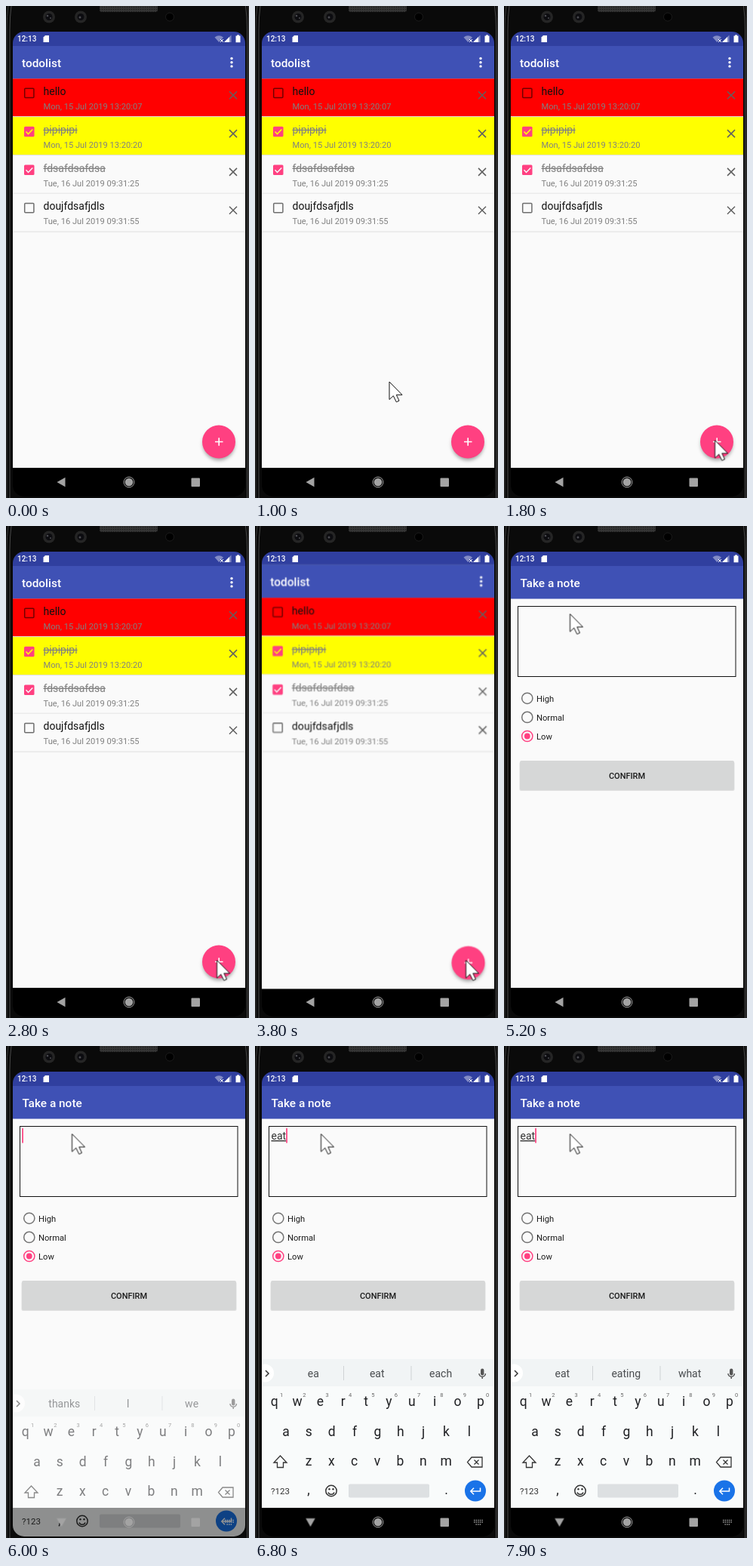
Recreate the animation shown at these times as an HTML page. Size 322x652 px, loop 8000 ms.

```html
<!DOCTYPE html>
<html lang="en">
<head>
<meta charset="utf-8">
<title>todolist</title>
<style>
html, body { margin: 0; width: 100%; height: 100%; overflow: hidden; background: #0a0a0a; }
svg { display: block; font-family: Roboto, sans-serif; }
.medium { font-weight: 500; }
.mid { text-anchor: middle; }
.line { fill: none; stroke-width: 1.5; }

/* Every part holds its pose until the next 100 ms step. */
.anim { animation: 8s step-end -5ms infinite; }
#list { animation-name: list; transform-origin: 163px 331px; }
#note { animation-name: note; transform-origin: 163px 331px; }
#ripple { animation-name: ripple; }
#lift { animation-name: lift; }
#caret { animation-name: caret; }
#typed1 { animation-name: typed1; }
#typed2 { animation-name: typed2; }
#typed3 { animation-name: typed3; }
#words1 { animation-name: words1; }
#words2 { animation-name: words2; }
#words3 { animation-name: words3; }
#keyboard { animation-name: keyboard; }
#back { animation-name: back; transform-origin: 73.5px 631px; }
#switcher { animation-name: switcher; }
#pointer { animation-name: pointer; }

@keyframes list {
  0% { transform: none; opacity: 1; }
  46.25% { transform: scale(1.002); }
  47.5% { transform: scale(1.005); }
  48.75% { transform: scale(1.04); }
  51.25% { transform: scale(1.045); opacity: 1; }
  52.5%, 100% { transform: none; opacity: 0; }
}
@keyframes note {
  0% { transform: scale(.96); opacity: 0; }
  48.75% { transform: scale(.96); opacity: 1; }
  51.25% { transform: scale(.993); }
  52.5%, 100% { transform: none; opacity: 1; }
}
@keyframes ripple {
  0% { opacity: 0; }
  32.5% { opacity: .14; }
  33.75% { opacity: .24; }
  35%, 100% { opacity: 0; }
}
@keyframes lift {
  0% { opacity: 0; }
  32.5% { opacity: 1; }
  35%, 100% { opacity: 0; }
}
@keyframes caret {
  0% { opacity: 1; transform: none; }
  52.5% { opacity: 0; }
  58.75% { opacity: 1; }
  65% { opacity: 0; }
  71.25% { opacity: 1; }
  77.5% { opacity: 0; transform: none; }
  78.75% { opacity: 1; transform: translateX(7.5px); }
  80% { transform: translateX(15px); }
  85% { opacity: 1; transform: translateX(20px); }
  91.25% { opacity: 0; }
  98.75%, 100% { opacity: 1; transform: translateX(20px); }
}
@keyframes typed1 { 0%, 80% { opacity: 0; } 78.75% { opacity: 1; } 100% { opacity: 0; } }
@keyframes typed2 { 0%, 85% { opacity: 0; } 80% { opacity: 1; } 100% { opacity: 0; } }
@keyframes typed3 { 0% { opacity: 0; } 85%, 100% { opacity: 1; } }
@keyframes words1 { 0% { opacity: 1; } 80%, 100% { opacity: 0; } }
@keyframes words2 { 0%, 86.25% { opacity: 0; } 80% { opacity: 1; } 100% { opacity: 0; } }
@keyframes words3 { 0% { opacity: 0; } 86.25%, 100% { opacity: 1; } }
@keyframes keyboard {
  0% { opacity: 0; transform: translateY(46px); }
  71.25% { opacity: .35; transform: translateY(46px); }
  75% { opacity: .57; transform: translateY(40px); }
  77.5% { opacity: .9; transform: translateY(10px); }
  78.75%, 100% { opacity: 1; transform: none; }
}
@keyframes back {
  0% { transform: none; }
  67.5% { transform: rotate(-50deg); }
  68.75%, 100% { transform: rotate(-90deg); }
}
@keyframes switcher { 0% { opacity: 0; } 67.5%, 100% { opacity: 1; } }
@keyframes pointer {
  0% { transform: translate(400px, 64px); }
  5% { transform: translate(309px, 64px); }
  6.25% { transform: translate(226px, 198px); }
  7.5% { transform: translate(167px, 318px); }
  8.75% { transform: translate(141px, 387px); }
  10% { transform: translate(130px, 439px); }
  11.25% { transform: translate(138px, 466px); }
  12.5% { transform: translate(178px, 498px); }
  13.75% { transform: translate(214px, 528px); }
  15% { transform: translate(241px, 550px); }
  16.25% { transform: translate(262px, 566px); }
  17.5% { transform: translate(277px, 576px); }
  18.75% { transform: translate(288px, 580px); }
  20% { transform: translate(286px, 579px); }
  21.25% { transform: translate(282px, 577px); }
  22.5% { transform: translate(279.5px, 575.5px); }
  55% { transform: translate(272px, 542px); }
  56.25% { transform: translate(241px, 442px); }
  57.5% { transform: translate(196px, 322px); }
  58.75% { transform: translate(150px, 222px); }
  60% { transform: translate(115px, 158px); }
  61.25% { transform: translate(95px, 127px); }
  62.5%, 100% { transform: translate(87.5px, 116.5px); }
}
</style>
</head>
<body>
<svg width="322" height="652" viewBox="0 0 322 652">
  <defs>
    <clipPath id="screen"><rect x="9" y="34" width="308" height="616" rx="15"/></clipPath>
    <filter id="blur" x="-50%" y="-50%" width="200%" height="200%"><feGaussianBlur stdDeviation="2.6"/></filter>
    <pattern id="mesh" width="3" height="3" patternUnits="userSpaceOnUse">
      <rect width="3" height="3" fill="#353535"/><circle cx="1.5" cy="1.5" r=".8" fill="#1c1c1c"/>
    </pattern>
    <g id="base">
      <rect x="9" y="34" width="308" height="616" fill="#fafafa"/>
      <rect x="9" y="34" width="308" height="19" fill="#303f9f"/>
      <rect x="9" y="53" width="308" height="43.5" fill="#3f51b5"/>
      <rect x="9" y="612" width="308" height="38" fill="#000"/>
    </g>
  </defs>

  <!-- phone body -->
  <rect width="322" height="652" fill="#0a0a0a"/>
  <g fill="none">
    <path d="M3 0Q1 14 1 30V652M321 0Q321.5 14 321.5 30V652" stroke="#3a3a3a"/>
    <path d="M7 0Q5 14 5 32V652M317.500 0Q319.500 14 319.500 32V652" stroke="#484848"/>
  </g>
  <rect x="124" y="-4" width="77" height="12" rx="3" fill="url(#mesh)"/>
  <g fill="#252525">
    <circle cx="57" cy="14.500" r="8"/><circle cx="99" cy="14.500" r="8"/>
  </g>
  <g fill="#0c0c10">
    <circle cx="57" cy="14.500" r="4.500"/><circle cx="99" cy="14.500" r="4.500"/>
  </g>
  <g fill="#4a4a50">
    <circle cx="55" cy="13" r="1.300"/><circle cx="59" cy="16" r="1"/><circle cx="98" cy="15" r="1.500"/>
  </g>
  <circle cx="217" cy="14.500" r="5.500" fill="#000" stroke="#1c1c1c"/>

  <g clip-path="url(#screen)">
    <g id="list" class="anim">
      <use href="#base"/>
      <text x="21" y="80.500" font-size="15.400" fill="#fff" class="medium">todolist</text>
      <g fill="#fff">
        <circle cx="299" cy="69.500" r="1.700"/><circle cx="299" cy="74.700" r="1.700"/><circle cx="299" cy="79.900" r="1.700"/>
      </g>
      <g id="rows"></g>
      <circle id="lift" class="anim" cx="282" cy="584" r="21" opacity="0" fill="rgba(0,0,0,.3)" filter="url(#blur)"/>
      <circle cx="282" cy="581" r="21" fill="rgba(0,0,0,.36)" filter="url(#blur)"/>
      <circle cx="282" cy="577.500" r="22" fill="#ff4081"/>
      <path d="M277 577.500H287.500M282.200 572.300V582.700" stroke="#fff" stroke-width="1.600"/>
      <circle id="ripple" class="anim" cx="282" cy="577.500" r="22" fill="#fff" opacity="0"/>
    </g>

    <g id="note" class="anim" opacity="0">
      <use href="#base"/>
      <text x="21.500" y="80.500" font-size="15.400" fill="#fff" class="medium">Take a note</text>
      <rect x="18.500" y="106.500" width="288.500" height="93" fill="none" stroke="#111"/>
      <g font-size="14" fill="#333">
        <text id="typed1" class="anim" x="21.500" y="124">e</text>
        <text id="typed2" class="anim" x="21.500" y="124">ea</text>
        <text id="typed3" class="anim" x="21.500" y="124">eat</text>
      </g>
      <g stroke="#333">
        <path id="under" d=""/>
      </g>
      <rect id="caret" class="anim" x="21.200" y="109" width="1.700" height="19.500" fill="#ff4081"/>
      <g id="radios"></g>
      <rect x="20.500" y="312.500" width="285" height="38.500" rx="2" fill="rgba(0,0,0,.1)"/>
      <rect x="21" y="311" width="284" height="39" rx="2" fill="#d6d7d7"/>
      <text x="163" y="334.700" font-size="11" fill="#1b1b1b" class="medium mid">CONFIRM</text>
    </g>

    <g id="keyboard" class="anim" opacity="0">
      <rect x="9" y="415" width="308" height="197" fill="#f9fbfb"/>
      <rect x="9" y="415" width="308" height="36" fill="#f1f4f5"/>
      <circle cx="13" cy="433.500" r="12" fill="#fff"/>
      <path d="M117.500 424V443M207 424V443" stroke="#cfd3d5"/>
      <g class="line" stroke="#333">
        <path d="M14 430L18 434L14 438"/>
        <path d="M297 434A4.200 4.200 0 0 0 305.400 434M301.200 438.500V441" stroke="#555"/>
        <path d="M33.500 543L42 552H37.500V558.500H29.500V552H25Z" stroke-width="1.300"/>
        <path d="M287 545H301V558H287L281.500 551.500ZM290.500 548.500L296.500 554.500M296.500 548.500L290.500 554.500" stroke-width="1.300"/>
        <circle cx="101" cy="589.500" r="7.200"/>
        <path d="M97 591.500A4.300 4.300 0 0 0 105 591.500"/>
      </g>
      <rect x="299" y="427.500" width="4.400" height="9" rx="2.200" fill="#555"/>
      <g fill="#333"><circle cx="98.500" cy="587.300" r="1.200"/><circle cx="103.500" cy="587.300" r="1.200"/></g>
      <g id="words" font-size="14" fill="#4a4d50" class="mid"></g>
      <g id="keys" font-size="17.500" fill="#202124" class="mid"></g>
      <text x="33.500" y="593.500" font-size="11.500" fill="#333" class="mid">?123</text>
      <rect x="124" y="580.500" width="107" height="18" rx="2" fill="#dde0e2"/>
      <circle cx="292" cy="589.500" r="14" fill="#1a73e8"/>
      <path class="line" d="M298.500 585.500V590H286M290 585.800L285.800 590L290 594.200" stroke="#fff"/>
    </g>

    <!-- system icons -->
    <text x="15" y="47" font-size="10" fill="#fff" class="medium">12:13</text>
    <path d="M52 39H57V48H49.500V41.500Z" fill="#fff"/>
    <path d="M276.500 41.500Q282 37 288 41.500L282.300 48Z" fill="#fff" opacity=".4"/>
    <path d="M284 44L288 48M288 44L284 48" stroke="#fff"/>
    <path d="M298.500 38.500V48H289Z" fill="#fff" opacity=".4"/>
    <path d="M296 41V48H289Z" fill="#fff"/>
    <path d="M304.500 39.500H306.300V38.300H308.700V39.500H310.500V48.200H304.500Z" fill="#fff"/>
    <g fill="#a3a3a3">
      <path id="back" class="anim" d="M67.500 631L78.500 624.700V637.300Z"/>
      <circle cx="163" cy="631" r="5.300"/>
      <circle cx="163" cy="631" r="6.900" fill="none" stroke="#a3a3a3"/>
      <rect x="245.500" y="625.500" width="11.500" height="11.500" rx="1"/>
      <path id="switcher" class="anim" opacity="0" d="M290 628.500H302M290 631H302M292.500 634H299.500" stroke="#a3a3a3" stroke-width="1.300" stroke-dasharray="1.400 1.200"/>
    </g>
  </g>

  <path id="pointer" class="anim" d="M0 0V23.500L5.300 18.600L9.300 26.800L13 25.100L9.300 17.300H17Z" fill="#fff" stroke="#111"/>
</svg>
<script>
const $ = id => document.getElementById(id);
const text = (x, y, s, attrs = "") => `<text x="${x}" y="${y}" ${attrs}>${s}</text>`;

const rows = [
  ["hello", "Mon, 15 Jul 2019 13:20:07", "#f00", false],
  ["pipipipi", "Mon, 15 Jul 2019 13:20:20", "#ff0", true],
  ["fdsafdsafdsa", "Tue, 16 Jul 2019 09:31:25", "#fafafa", true],
  ["doujfdsafjdls", "Tue, 16 Jul 2019 09:31:55", "#fafafa", false],
];
$("rows").innerHTML = rows.map(([label, date, color, done], i) => {
  const box = done
    ? `<rect x="24" y="109" width="13.500" height="13.500" rx="1.500" fill="#ff4081"/>
       <path class="line" d="M26.500 115.700L29.500 118.800L35.300 112.800" stroke="${color}"/>`
    : `<rect class="line" x="24.700" y="109.200" width="12.200" height="12.200" rx="1" stroke="#000" stroke-opacity=".56"/>`;
  const style = done ? 'fill="#808080" text-decoration="line-through"' : 'fill="#111"';
  return `<g transform="translate(0 ${i * 50.8})">
    <rect x="9" y="96.300" width="308" height="50" fill="${color}"/>
    <rect x="9" y="146.200" width="308" height="1" fill="#dedede"/>
    ${box}
    ${text(49.5, 118, label, `font-size="14" ${style}`)}
    ${text(49.5, 137, date, 'font-size="11.150" fill="#808080"')}
    <path class="line" d="M296 113.300L306 123.300M306 113.300L296 123.300" stroke="#606060"/>
  </g>`;
}).join("");

$("radios").innerHTML = ["High", "Normal", "Low"].map((label, i) => {
  const y = 228.3 + i * 25.1, on = label === "Low";
  return `<circle class="line" cx="30.800" cy="${y}" r="7.100" stroke="${on ? "#ff4081" : "#737373"}"/>
    ${on ? `<circle cx="30.800" cy="${y}" r="3.900" fill="#ff4081"/>` : ""}
    ${text(43, y + 4.2, label, 'font-size="11.200" fill="#1b1b1b"')}`;
}).join("");

// Composing text is underlined.
[1, 2, 3].forEach(n => $("typed" + n).setAttribute("text-decoration", "underline"));
$("under").remove();

const words = [["thanks", "I", "we"], ["ea", "eat", "each"], ["eat", "eating", "what"]];
$("words").innerHTML = words.map((set, n) =>
  `<g id="words${n + 1}" class="anim">${set.map((w, i) => text(77.3 + i * 84.4, 439, w)).join("")}</g>`
).join("");

const keyRow = (letters, x, y) => [...letters].map((c, i) => text(x + i * 30.35, y, c)).join("");
$("keys").innerHTML =
  keyRow("qwertyuiop", 25.7, 476.5) + keyRow("asdfghjkl", 41, 516.5) +
  keyRow("zxcvbnm", 71, 556) + text(71, 594, ",") + text(253.5, 594, ".") +
  [..."1234567890"].map((d, i) =>
    text(35 + i * 30.35, 464.5, d, 'font-size="7.500" fill="#666"')).join("");
</script>
</body>
</html>
```
